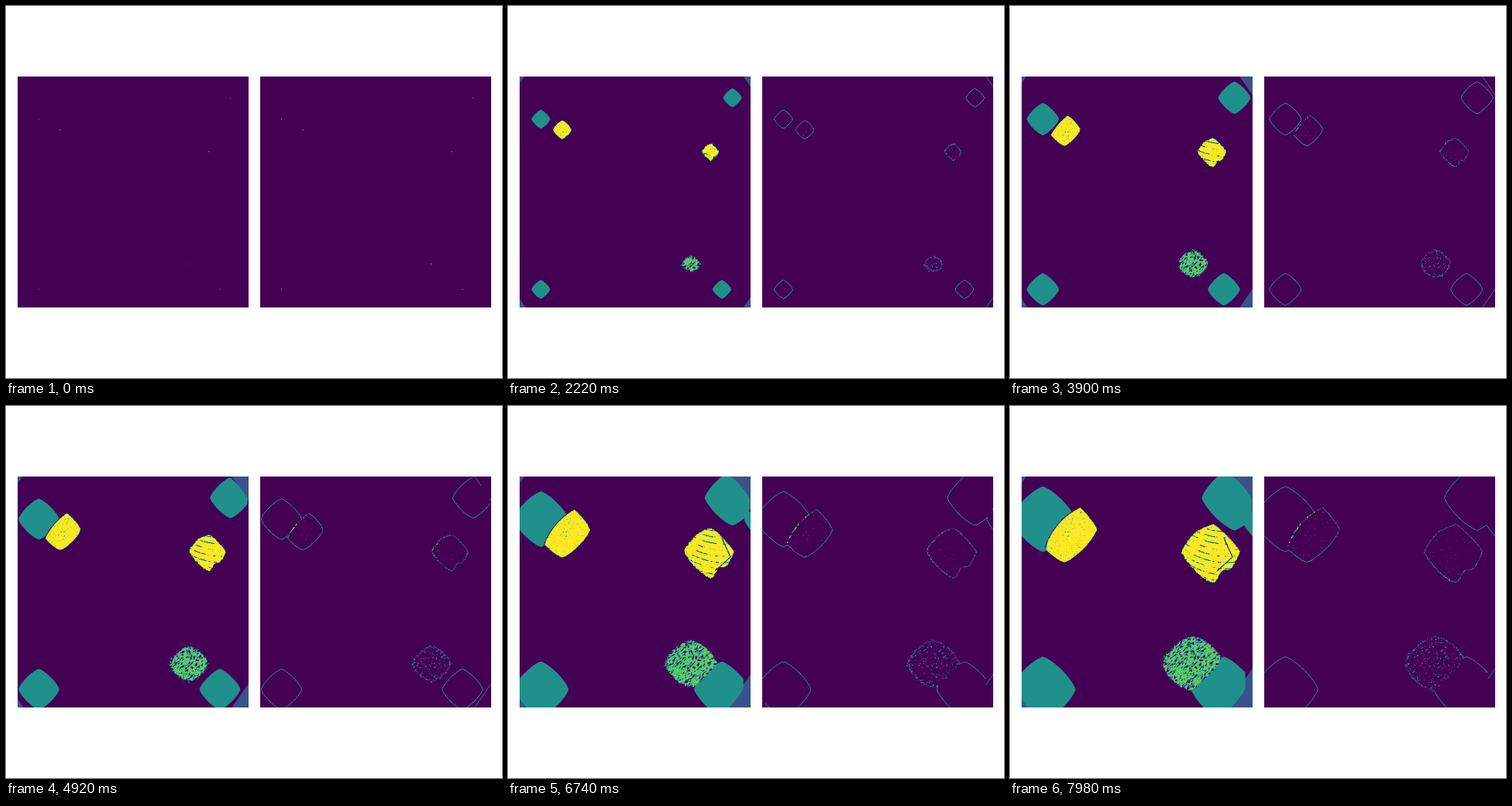
A matplotlib script that plays this animation: 640 px wide and 480 px high, repeating every 8000 ms.

```python
import numpy as np
import matplotlib.pyplot as plt
from matplotlib.animation import FuncAnimation

SIZE = 298             # panel side in pixels
SUB = 3                # cells per pixel
CELLS = SIZE * SUB
SPEED = 0.2425         # pixels grown per step
LEFT, RIGHT, TOP = 15, 328, 91
BLUE, TEAL, GREEN, YELLOW = 1, 2, 3, 4

rng = np.random.default_rng(4)
axis = ((np.arange(CELLS) + 0.5) / SUB).astype(np.float32)
X, Y = np.meshgrid(axis, axis)


def noise(shifts):
    """Unit noise, averaged over the given cell shifts."""
    a = rng.random((CELLS, CELLS), dtype=np.float32)
    a = sum(np.roll(a, s, (0, 1)) for s in shifts)
    return (a - a.mean()) / a.std()


def box(k):
    return [(i, j) for i in range(k) for j in range(k)]


def grow(cx, cy, power=1.3, squash=1):
    """Step at which a rounded diamond from (cx, cy) reaches each cell."""
    r = np.abs(X - cx) ** power + np.abs((Y - cy) * squash) ** power
    return np.maximum(r ** (1 / power) - 0.45, 0) / SPEED


def roughen(t, amount):
    return t + amount * rough * np.clip(t / 30, 0, 1)


def corner(dx, dy, limit=np.inf):
    t = dx / 0.206 + dy / 0.3 + 3
    return np.where(t < limit, t, np.inf)


def segment_distance(ax, ay, bx, by):
    ux, uy = bx - ax, by - ay
    k = np.clip(((X - ax) * ux + (Y - ay) * uy) / (ux * ux + uy * uy), 0, 1)
    return np.hypot(X - ax - k * ux, Y - ay - k * uy)


fine = noise(box(3))
rough = noise(box(5))
patchy = noise(box(12))
streaks = noise([(a - i, b + i) for i in range(6) for a, b in box(4)])

# Smooth grains; those at the left spill over to the right edge
seeds = [(27.4, 55), (27.4, 274.6), (274.6, 27.4), (261, 274.6)]
seeds += [(x + SIZE, y) for x, y in seeds[:2]]
teal = np.minimum.reduce([grow(x, y) for x, y in seeds])

blue = np.minimum.reduce([
    corner(SIZE - X, Y), corner(SIZE - X, SIZE - Y),
    corner(X, Y, 32), corner(X, SIZE - Y, 40)])

# Grain with one bowed side facing its smooth neighbour
across = (55 + 68.7 - X - Y) / np.sqrt(2)
along = (X - 55 - Y + 68.7) / np.sqrt(2)
side = across - (11 - 0.006 * (along - 6) ** 2)
solid = roughen(grow(55, 68.7), 0.8)
solid[side > 0] = np.inf

# Grain that lags to the upper right and has a notch below
angle = np.degrees(np.arctan2(Y - 96.8, X - 247))
lag = 1.04 + 0.25 * np.maximum(0, np.cos(np.radians(angle + 40)))
lag += 0.3 * np.exp(-((angle - 65) / 14) ** 2)
cracked = roughen(grow(247, 96.8) * lag, 2.2)

grainy = roughen(grow(221, 241.8, 1.5, 1.1) * 1.08, 4)

# The corner grains push the smooth ones back a little
fields = np.stack([blue, teal, grainy, solid, cracked])
weight = np.array([0.85, 1, 1, 1, 1]).reshape(-1, 1, 1)
pick = (fields * weight).argmin(axis=0)
arrival = np.take_along_axis(fields, pick[None], axis=0)[0].astype(np.float32)
value = np.array([BLUE, TEAL, GREEN, YELLOW, YELLOW], dtype=np.float32)[pick]
in_teal, in_grainy, in_solid, in_cracked = (pick == i for i in range(1, 5))

# Broken, gently sloping cracks and one bent split
band = (Y - 0.2 * X + 0.006 * (X - 247) ** 2) / 8 % 1
cracks = (np.abs(band - 0.5) < 0.055) & (patchy > 0.1)
split = np.minimum(segment_distance(261, 79, 272, 104),
                   segment_distance(272, 104, 253, 121))
cracks |= split < 0.5 + 0.15 * rough

seam = (np.abs(side) < 0.5 + 0.1 * rough) & (in_solid | in_teal)
seam &= np.abs(along) < 34
holes = in_grainy & ((streaks > 0.75) | (np.abs(grainy - teal) < 1.5))
holes |= in_cracked & (cracks | (fine > 2.6))
holes |= in_solid & (fine > 2.3)
holes |= seam
value[holes] = 0

# Cells that stay active after the front has passed
active = in_grainy & holes & (fine > 1.3)
active |= (in_solid | in_cracked) & (fine > 2.8)
active |= seam & (rough > 0.5)


def shrink(a):
    a = a.astype(np.float32)
    a = sum(a[i::SUB] for i in range(SUB))
    return sum(a[:, i::SUB] for i in range(SUB)) / SUB ** 2


cache = {}


def panels(step):
    if step not in cache:
        level = step + 0.5
        grown = arrival <= level
        front = grown & ((arrival > level - 1.6) | active)
        cache[step] = shrink(value * grown), shrink(front)
    return cache[step]


def step_at(ms):
    """Three steps every 140 ms, held for 20, 100 and 20 ms."""
    cycle, rest = divmod(ms, 140)
    return 3 * cycle + (rest >= 20) + (rest >= 120)


fig = plt.figure(figsize=(6.4, 4.8), dpi=100, facecolor="white")
blank = np.zeros((SIZE, SIZE), dtype=np.float32)
style = dict(yo=480 - TOP - SIZE, cmap="viridis", vmin=0, origin="upper")
grains = fig.figimage(blank, xo=LEFT, vmax=4, **style)
fronts = fig.figimage(blank, xo=RIGHT, vmax=1, **style)


def update(frame):
    body, edge = panels(step_at(frame * 20))
    grains.set_data(body)
    fronts.set_data(edge)
    return grains, fronts


anim = FuncAnimation(fig, update, frames=400, interval=20, repeat=True,
                     repeat_delay=0, cache_frame_data=False)
plt.show()
```
